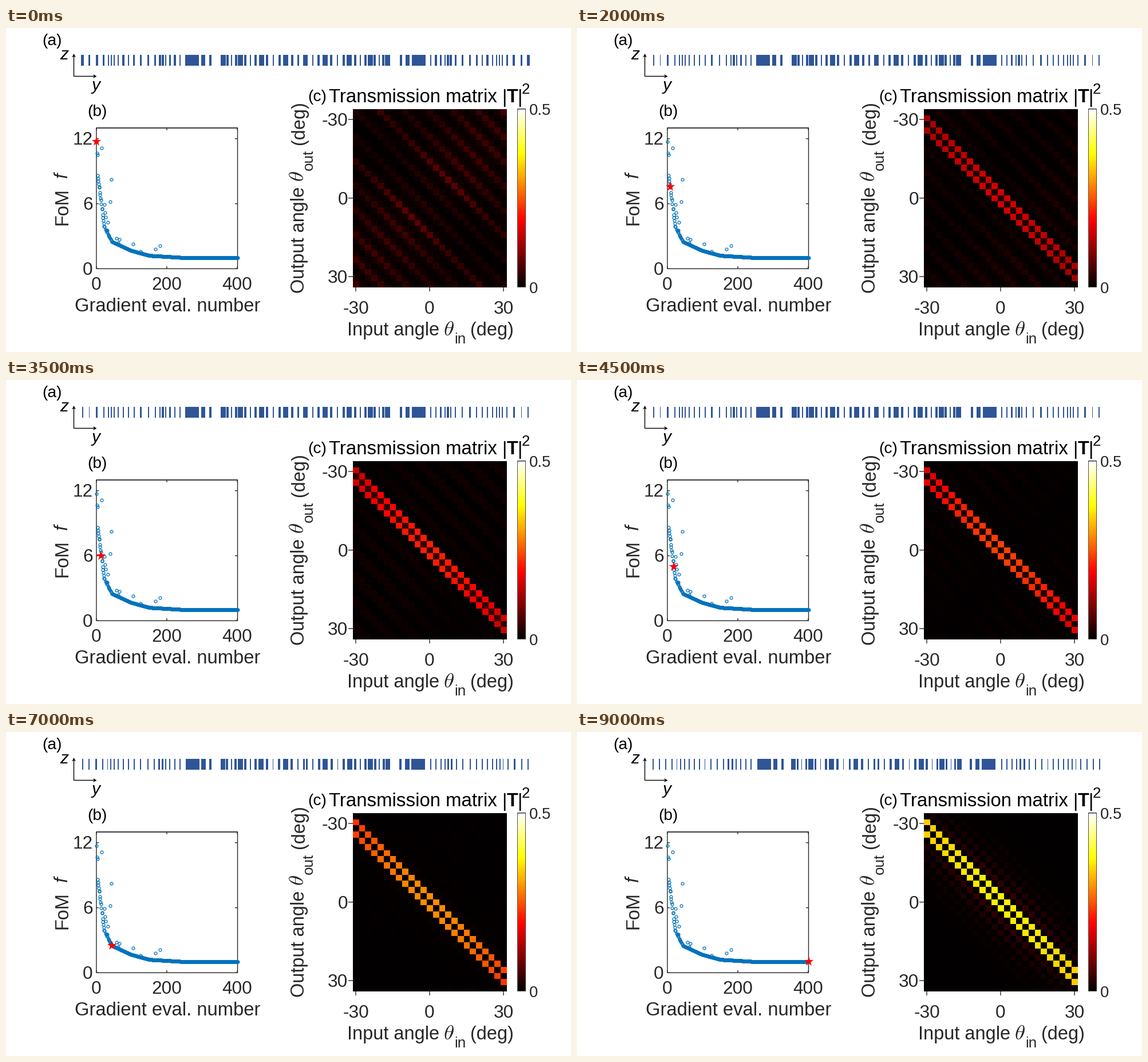
A matplotlib script for the animation above (9500 ms loop, 987x567 px).

```python
import numpy as np
import matplotlib.pyplot as plt
from matplotlib.animation import FuncAnimation
from matplotlib.collections import PolyCollection
from matplotlib.colors import ListedColormap

W, H, DPI = 987, 567, 128
PT = 72 / DPI
STEPS, INTERVAL = 19, 500
INK, BLUE, BAR = "#262626", "#0072BD", "#2F5597"

plt.rcParams["font.family"] = "Liberation Sans"
plt.rcParams["mathtext.fontset"] = "cm"

fig = plt.figure(figsize=(W / DPI, H / DPI), dpi=DPI, facecolor="white")
ax = fig.add_axes([0, 0, 1, 1])
ax.axis("off")


def text(x, y, s, size=32.5, ha="left", rot=0, color=INK, **kw):
    ax.text(x, y, s, fontsize=size * PT, ha=ha, va="baseline", rotation=rot,
            rotation_mode="anchor", color=color, **kw)


def line(xs, ys, color=INK, lw=1.4):
    ax.plot(xs, ys, color=color, lw=lw * PT, solid_capstyle="butt",
            solid_joinstyle="miter", snap=False)


def box(x0, y0, x1, y1, lw=1.4):
    line([x0, x1, x1, x0, x0, x1], [y0, y0, y1, y1, y0, y0], lw=lw)


# ---- (a) grating: the left half follows a few spacing rules, mirrored at MID
MID = 523
outer, inner = np.arange(20), np.arange(16)
thin = np.random.default_rng(3).uniform(1.6, 4, outer.size)


def bar_verts(i):
    narrow = 1 - np.exp(-i)
    spread = np.clip((i - 12) / 6, 0, 1)
    ripple = 11 - 5 * spread
    c = np.r_[133 + 9 * outer + ripple * np.cos(np.pi * (outer - 3.3) / 10) ** 4,
              np.linspace(320.2, 356.5, 4) + 2 * spread,
              379.5 + 9.1 * inner - 7 * np.sin(np.pi * inner / 12)
              - 1.5 * spread]
    w = np.r_[thin * (1 - 0.15 * narrow - 0.15 * spread),
              np.linspace(13.5, 4, 4),
              2.2 + 7 * np.cos(np.pi * inner / 4) ** 4 - 0.7 * spread]
    w[0] = 5 - 3 * narrow
    c, w = np.r_[c, 2 * MID - c], np.r_[w, w]
    return [[(a, 47), (b, 47), (b, 66), (a, 66)]
            for a, b in zip(c - w / 2, c + w / 2)]


bars = PolyCollection(bar_verts(0), facecolors=BAR, edgecolors="none")
ax.add_collection(bars)

line([118.5, 118.5, 157], [46, 84.5, 84.5], "black")
for tip in ([(118.5, 45), (115, 51.5), (118.5, 49.5), (122, 51.5)],
            [(158.5, 84.5), (152, 81), (154, 84.5), (152, 88)]):
    ax.fill(*zip(*tip), color="black", lw=0)
text(63.5, 30, "(a)", 28, color="black")
text(94.5, 55, "z", 30, color="black", style="italic")
text(150, 109, "y", 30, color="black", style="italic")

# ---- (b) convergence curve with seeded line-search overshoots
KNOTS = [1, 4, 8, 14, 22, 44, 97, 150, 240, 401]
LEVELS = [11.7, 8.6, 7.57, 6, 3.93, 2.5, 1.7, 1.22, 1.04, 1]
STRAYS = {15: 11.15, 40: 6.2, 43: 8.25, 167: 1.83, 180: 2.15}

n = np.arange(1, 402)
visits = np.rint(np.exp(np.interp(
    np.arange(STEPS), [0, 2, 4, 7, 11, 14, 18],
    np.log([1, 4, 8, 14, 22, 44, 401])))).astype(int)

rng = np.random.default_rng(8)
fom = np.interp(n, KNOTS, LEVELS)
bumps = (rng.random(n.size) < 0.5 * np.exp(-n / 45)) & ~np.isin(n, visits)
fom += bumps * rng.exponential(1.6, n.size) * np.exp(-n / 60)
fom = np.minimum(fom, 11.7)
for k, v in STRAYS.items():
    fom[k - 1] = v
px = 157.7 + 0.616 * n
py = 421.3 - 18.96 * fom

box(157.9, 174.7, 404.5, 421.3)
for x, s in ((157.7, "0"), (280.9, "200"), (404.1, "400")):
    text(x, 458, s, 31.5, "center")
    line([x, x], [421, 417])
    line([x, x], [175, 179])
for y, s in ((421.3, "0"), (307.5, "6"), (193.8, "12")):
    text(151.5, y + 10.5, s, 31.5, "right")
    line([158, 162], [y, y])
    line([404, 400], [y, y])
ax.plot(px, py, "o", ms=4.9 * PT, mfc="none", mec=BLUE, mew=1.25 * PT)
star, = ax.plot([], [], "*", ms=17.5 * PT, color="red", mew=0, zorder=5)
text(142, 154.5, "(b)", 28, color="black")
text(119.5, 496.5, "Gradient eval. number", 32.7)
text(107, 345, "FoM", rot=90)
text(107, 262, "f", rot=90, style="italic")

# ---- (c) transmission matrix
ROWS, COLS = 29, 25
row, col = np.mgrid[:ROWS, :COLS]
off = np.abs(row - col - 2)
along = (row + col - 26) / 26

m = np.arange(1, 257)
hot = ListedColormap(np.clip(
    np.c_[m / 96, (m - 96) / 96, (m - 192) / 64], 0, 1))


def matrix(i):
    s = i / (STEPS - 1)
    # drifting side orders that fade as the design improves
    stripes = np.cos(np.pi * (off - 6 - 1.5 * i) / 4) ** 4
    wave = 0.75 + 0.25 * np.cos((3 + off % 4) * along + i)
    near = np.minimum(1, 0.4 + off / 10)
    t = 0.045 * np.exp(-i / 6) * (0.1 + 0.9 * stripes) * wave * near
    if i == 0:
        t[off == 6] *= 1.5
        return t
    # the two wanted orders, brightest at normal incidence
    peak = np.interp(i, [0, 2, 7, 14, 18], [0.03, 0.115, 0.21, 0.29, 0.362])
    edge = peak * (0.92 - 0.25 * np.sin(np.pi * s))
    main = edge + (peak - edge) * np.cos(np.pi / 2 * along)
    halo = 0.035 * s ** 8 * np.exp(-(off - 3) / 3.2) * np.cos(1.2 * along)
    t = np.where(off % 2 == 1, t + halo, t)
    t[off == 0] = 0.035 * np.exp(-((i - 6.5) / 3) ** 2)
    return np.where(off == 1, main, t)


def heat(data, extent):
    return ax.imshow(data, extent=extent, cmap=hot, vmin=0, vmax=0.5,
                     interpolation="nearest", aspect="auto")


img = heat(matrix(0), (605.5, 874.5, 453.8, 141.8))
heat(np.linspace(0.5, 0, 256)[:, None], (893.5, 907.5, 453.5, 142))
box(893.5, 141.8, 907.5, 453.5, 0.8)
for x, y, s in ((611, 160, "-30"), (740, 297.6, "0"), (869, 435, "30")):
    text(x, 500, s, 31.5, "center")
    text(597, y + 11, s, 31.5, "right")
    line([x, x], [454, 461])
    line([598, 606], [y, y])
text(913.5, 152.5, "0.5", 27.5)
text(913.5, 463.5, "0", 27.5)

text(527, 127.5, "(c)", 28, color="black")
text(564.5, 130.5, "Transmission matrix", 33, color="black")
text(866.5, 130.5, "|", color="black")
text(874.5, 130.5, "T", color="black", weight="bold")
text(893, 130.5, "|", color="black")
text(900.5, 115, "2", 26, color="black")

text(595.5, 538, "Input angle")
text(763.5, 538, r"$\theta$", 37)
text(783, 552, "in", 26)
text(811, 538, "(deg)")
text(520.5, 463.5, "Output angle", rot=90)
text(520.5, 269, r"$\theta$", 37, rot=90)
text(535.5, 249, "out", 26, rot=90)
text(520.5, 204.5, "(deg)", rot=90)

ax.set_xlim(0, W)
ax.set_ylim(H, 0)


def update(i):
    bars.set_verts(bar_verts(i))
    k = visits[i] - 1
    star.set_data([px[k]], [py[k]])
    img.set_data(matrix(i))
    return bars, star, img


anim = FuncAnimation(fig, update, frames=STEPS, interval=INTERVAL,
                     repeat=True, repeat_delay=0, blit=False)
plt.show()
```
